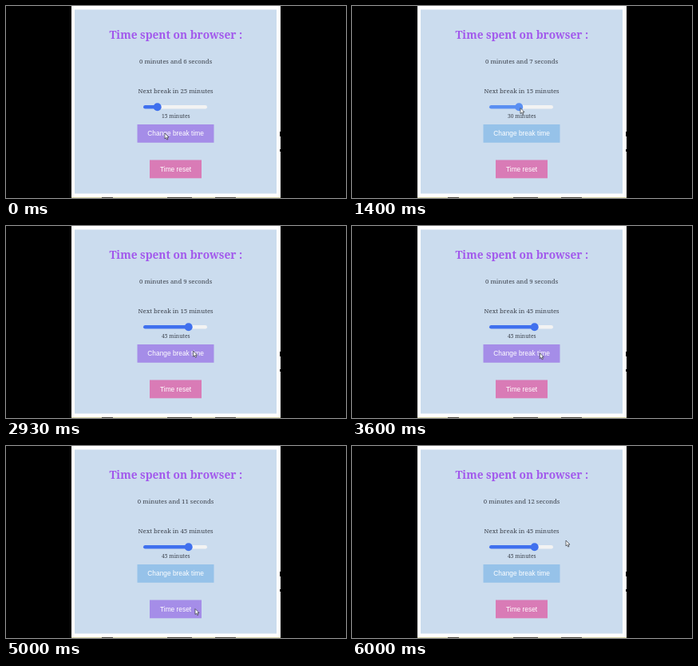
An HTML page for the animation above (6070 ms loop, 426 by 240 pixels).

```html
<!DOCTYPE html>
<html lang="en">
<head>
<meta charset="utf-8">
<title>Break timer</title>
<style>
  html, body { margin: 0; width: 100%; height: 100%; overflow: hidden; background: #000; }
  svg { display: block; width: 100vw; height: 100vh; }
  text { text-anchor: middle; font-family: "Noto Serif", serif; fill: #3c424c; }
  .title { font-size: 13.7px; font-weight: 700; fill: #a259ec; }
  .line { font-size: 7.85px; }
  .small { font-size: 6.75px; }
  .label { font: 8.35px "Liberation Sans", Arial, sans-serif; fill: #fff; }
</style>
</head>
<body>
<svg viewBox="0 0 426 240">
  <rect width="426" height="240" fill="#000"/>
  <rect x="82" width="262" height="239" fill="#fff"/>
  <rect x="86" y="4.5" width="253" height="230" fill="#cbdcee"/>
  <path d="M82 239.5h262" stroke="#d8d4a8"/>
  <path d="M120 239.5h14M202 239.5h31M262 239.5h26" stroke="#4a4638"/>
  <path d="M343.5 157v6M343.5 179v3" stroke="#222"/>

  <text class="title" x="212.8" y="41">Time spent on browser :</text>
  <text class="line" id="spent" x="212.6" y="72"></text>
  <text class="line" id="next" x="212.6" y="109"></text>

  <rect x="172" y="124" width="80" height="4.6" rx="2.3" fill="#f3f3f3"/>
  <rect id="fill" x="172" y="124" height="4.6" rx="2.3"/>
  <circle id="thumb" cy="126.3" r="5"/>
  <text class="small" id="value" x="212.8" y="139.8"></text>

  <rect id="change" x="164.5" y="148" width="96" height="22.8"/>
  <text class="label" x="212.6" y="162.2">Change break time</text>
  <rect id="reset" x="180" y="192.5" width="65" height="22.8"/>
  <text class="label" x="212.6" y="206.8">Time reset</text>

  <path id="cursor" d="M0 0v7l1.6-1.4 1.2 2.5 1.2-.6-1.2-2.4h2.2z"
        fill="#fff" stroke="#30343c" stroke-width=".7" stroke-linejoin="round"/>
</svg>
<script>
const LOOP = 6070;
const FIRST_TICK = 700;
const $ = id => document.getElementById(id);

// Pointer stops: time, x, y
const path = [
  [0, 199, 159], [420, 199, 159], [800, 190, 127], [950, 190, 127],
  [1330, 211, 127.5], [1480, 211, 127.5], [1900, 229.5, 127], [2150, 229.5, 127],
  [2700, 234.5, 156], [3400, 235, 157], [3900, 236, 162], [4350, 236, 162],
  [4800, 237, 203.5], [5250, 237, 203.5], [5850, 268, 118], [LOOP, 268, 118]
];
const drag = { from: 850, to: 2120 };
const clicks = [[0, 25], [350, 15], [3400, 45]];

const ease = p => p * p * (3 - 2 * p);

function pointer(t) {
  const i = path.findIndex(stop => stop[0] > t);
  const [t0, x0, y0] = path[i - 1], [t1, x1, y1] = path[i];
  const p = ease((t - t0) / (t1 - t0));
  return [x0 + (x1 - x0) * p, y0 + (y1 - y0) * p];
}

function minutesAt(t) {
  if (t < drag.from) return 15;
  const [x] = pointer(Math.min(t, drag.to));
  return Math.round((5 + (x - 176.7) / 1.3) / 5) * 5;
}

function setText(id, text) {
  const el = $(id);
  if (el.textContent !== text) el.textContent = text;
}

function paintButton(id, x, y, color) {
  const b = $(id).getBBox();
  const over = x > b.x && x < b.x + b.width && y > b.y && y < b.y + b.height;
  $(id).setAttribute("fill", over ? "#a58de8" : color);
}

function draw(t) {
  const [x, y] = pointer(t);
  const minutes = minutesAt(t);
  const thumbX = 176.7 + (minutes - 5) * 1.3;
  const color = t > drag.from && t < drag.to ? "#5a8ff2" : "#3f70ee";
  const seconds = 7 + Math.floor((t - FIRST_TICK) / 1000);
  const pause = clicks.filter(c => c[0] <= t).pop()[1];

  setText("spent", `0 minutes and ${seconds} seconds`);
  setText("next", `Next break in ${pause} minutes`);
  setText("value", `${minutes} minutes`);
  $("fill").setAttribute("width", thumbX - 172);
  $("fill").setAttribute("fill", color);
  $("thumb").setAttribute("cx", thumbX);
  $("thumb").setAttribute("fill", color);
  paintButton("change", x, y, "#96c2e9");
  paintButton("reset", x, y, "#d97bb6");
  $("cursor").setAttribute("transform", `translate(${x} ${y})`);
}

const start = performance.now();
function frame(now) {
  draw(Math.max(0, now - start) % LOOP);
  requestAnimationFrame(frame);
}
draw(0);
requestAnimationFrame(frame);
</script>
</body>
</html>
```
